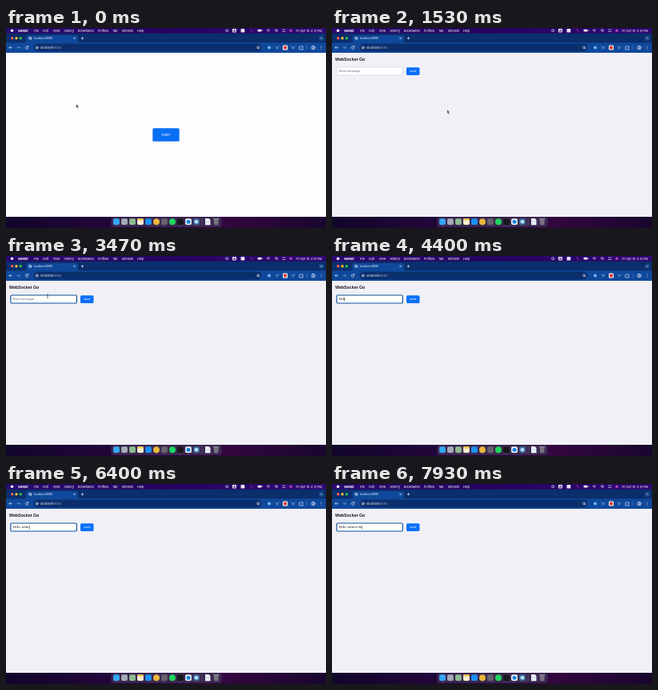
An HTML page for the animation above (8000 ms loop, 400 by 250 pixels).

```html
<!DOCTYPE html>
<html lang="en">
<head>
<meta charset="utf-8">
<title>WebSocket Go</title>
<style>
  html, body { margin: 0; width: 100%; height: 100%; overflow: hidden; background: #170536; }
  svg { display: block; width: 100vw; height: 100vh; }
  text { font-family: Inter, Roboto, sans-serif; font-size: 3.7px; fill: #fff; white-space: pre; }
  .arial { font-family: "Liberation Sans", Arial, sans-serif; }
  .bold { font-weight: 700; }
  .line { fill: none; stroke: #e4ecfa; stroke-width: .65; stroke-linecap: round; stroke-linejoin: round; }

  #start, #chat, #hover, #pointer, #arrow, #hand, #beam, #focus {
    animation: 8s infinite step-end;
  }
  #start { animation-name: start; }
  #chat { animation-name: chat; }
  #hover { animation-name: hover; }
  #focus { animation-name: focus; }
  #pointer { animation-name: move; animation-timing-function: ease-in-out; }
  #arrow { animation-name: arrow; }
  #hand { animation-name: hover; }
  #beam { animation-name: beam; }

  @keyframes start { 0% { opacity: 1 } 13.5%, 100% { opacity: 0 } }
  @keyframes chat { 0% { opacity: 0 } 13.5%, 100% { opacity: 1 } }
  @keyframes hover { 0% { opacity: 0 } 6.8% { opacity: 1 } 13.5%, 100% { opacity: 0 } }
  @keyframes focus { 0% { opacity: 0 } 27%, 100% { opacity: 1 } }
  @keyframes arrow { 0% { opacity: 1 } 6.8% { opacity: 0 } 13.5% { opacity: 1 } 23%, 100% { opacity: 0 } }
  @keyframes beam { 0% { opacity: 0 } 23% { opacity: 1 } 46.25%, 100% { opacity: 0 } }
  @keyframes move {
    0%, 1.5% { transform: translate(87.7px, 95.2px) }
    7.6%, 15% { transform: translate(194.5px, 131px) }
    25%, 100% { transform: translate(52px, 50px) }
  }
</style>
</head>
<body>
<svg viewBox="0 0 400 250" preserveAspectRatio="none">
  <defs>
    <linearGradient id="menuFill">
      <stop offset="0" stop-color="#2a0871"/><stop offset=".5" stop-color="#25045f"/><stop offset="1" stop-color="#300775"/>
    </linearGradient>
    <linearGradient id="deskFill">
      <stop offset="0" stop-color="#12062b"/><stop offset=".3" stop-color="#210639"/>
      <stop offset=".7" stop-color="#32073f"/><stop offset="1" stop-color="#19062d"/>
    </linearGradient>
  </defs>

  <!-- Menu bar -->
  <rect width="400" height="7.5" fill="url(#menuFill)"/>
  <circle cx="7.5" cy="3.2" r="1.7" fill="#fff"/>
  <g id="menu"></g>
  <g id="status">
    <circle cx="276" cy="3.2" r="1.5" class="line" stroke-width="1"/>
    <rect x="283" y="1" width="4.8" height="4.6" rx=".8" fill="#fff"/>
    <path d="M284.2 4.8l1.2-3 1.2 3m-2-1h1.6" class="line" style="stroke:#25045f"/>
    <rect x="293.5" y="1" width="4.8" height="4.6" rx=".8" fill="#e9e3f6"/>
    <path d="M305.8 1.6l2.4 3.2" class="line" style="stroke:#d64a82"/>
    <rect x="314.5" y="1.8" width="5" height="2.8" rx=".8" fill="#eee"/>
    <path d="M320.2 2.8v.8M326 2.4q1.8-1.4 3.6 0M326.8 3.5q1-.8 2 0M327.8 4.6v.1" class="line"/>
    <circle cx="337.6" cy="2.8" r="1.3" class="line"/>
    <path d="M338.7 3.9l1.1 1.1M345.5 2h3.6M345.5 4.4h3.6" class="line"/>
    <circle cx="356" cy="3.2" r="1.8" fill="#b04ca8"/>
  </g>
  <text x="362.5" y="4.7">Fri Apr 18  4:12 PM</text>

  <!-- Tab strip -->
  <rect y="6.7" width="400" height="12" fill="#0b2e6c"/>
  <circle cx="7.7" cy="12.8" r="1.7" fill="#ff5f57"/>
  <circle cx="13" cy="12.8" r="1.7" fill="#febc2e"/>
  <circle cx="18.3" cy="12.8" r="1.7" fill="#28c840"/>
  <path d="M24 18.7q1.5 0 1.5-1.5V11q0-2 2-2H88q2 0 2 2v6.2q0 1.5 1.5 1.5z" fill="#10499b"/>
  <circle cx="30.2" cy="12.8" r="1.6" class="line"/>
  <path d="M28.8 12.3l2 .8.6 1" class="line"/>
  <text x="34.8" y="14" style="font-size:3.3px">localhost:8080</text>
  <path d="M84.7 11.9l1.8 1.8m0-1.8l-1.8 1.8M94 12.8h3m-1.5-1.5v3" class="line"/>
  <rect x="391" y="9.8" width="6" height="6" rx="1.5" fill="#174889"/>
  <path d="M393 12.3l1.1 1.1 1.1-1.1" class="line"/>

  <!-- Toolbar -->
  <rect y="18.2" width="400" height="12.8" fill="#10499b"/>
  <path d="M7.4 24.5H4m1.4-1.5L4 24.5 5.4 26" class="line"/>
  <path d="M14 24.5h3.4M16 23l1.4 1.5L16 26" class="line" style="stroke:#7fa1d2"/>
  <path d="M27.6 23.6a1.8 1.8 0 1 0 .2 1.5M27.8 22.4v1.4h-1.4" class="line"/>
  <rect x="34.5" y="19.8" width="285" height="9.4" rx="4.7" fill="#0b2e6c"/>
  <circle cx="38.7" cy="24.5" r="1.6" class="line"/>
  <path d="M38.7 24.3v1" class="line"/>
  <text x="43.2" y="25.8">localhost<tspan fill="#9cafd0">:8080</tspan></text>
  <circle cx="315" cy="24.3" r="1.4" class="line"/>
  <path d="M316 25.3l.8.8" class="line"/>
  <circle cx="329" cy="24.5" r="2" fill="#6db7f5"/>
  <path d="M337.3 23l1.7 3 1.7-3M357.3 23l1.7 3 1.7-3" class="line" style="stroke:#b5c5de"/>
  <rect x="346" y="21.5" width="6" height="6" rx="1.2" fill="#f4f4f4"/>
  <rect x="347" y="22.5" width="4" height="4" rx="1" fill="#d93c3c"/>
  <path d="M367.2 23.2h1.3q.8-1.8 1.6 0h1.1v1.2q-1.5.4 0 1.2v1.3h-4z" class="line"/>
  <path d="M376.2 22.2v4.6" class="line" style="stroke:#5284c7"/>
  <circle cx="384" cy="24.5" r="2.3" class="line"/>
  <circle cx="384" cy="23.9" r=".8" fill="#e4ecfa"/>
  <path d="M382.7 26q1.3-1.2 2.6 0M394 22.8v.1M394 24.5v.1M394 26.2v.1" class="line"/>

  <!-- First page -->
  <g id="start">
    <rect y="31" width="400" height="205" fill="#fdfdfe"/>
    <rect x="183.3" y="125.2" width="33.4" height="16.6" rx="1.6" fill="#0a6ff5"/>
    <text x="200" y="134.8" text-anchor="middle" class="arial">START</text>
    <g id="hover" fill="none" stroke="#173a70" stroke-width=".6">
      <rect x="183.3" y="125.2" width="33.4" height="16.6" rx="1.6"/>
      <path d="M187 126.2q6.5-5.6 13 0" stroke="#333"/>
    </g>
  </g>

  <!-- Second page -->
  <g id="chat">
    <rect y="31" width="400" height="205" fill="#f0f0f6"/>
    <text x="4" y="41" class="arial bold" style="font-size:5.3px;fill:#16161c">WebSocket Go</text>
    <rect x="5.8" y="49" width="82.6" height="10" rx="1.4" fill="#fff" stroke="#c7c9d0" stroke-width=".5"/>
    <rect id="focus" x="5.8" y="49" width="82.6" height="10" rx="1.4" fill="none" stroke="#1c5aa6" stroke-width="1.2"/>
    <text id="message" x="8.7" y="55.3" class="arial" style="font-size:3.9px"></text>
    <rect id="caret" y="52" width=".5" height="4.2" fill="#111"/>
    <rect x="93" y="49.2" width="16.5" height="9.9" rx="1.6" fill="#0a70fb"/>
    <text x="101.2" y="55.3" text-anchor="middle" class="arial">send</text>
  </g>

  <!-- Dock -->
  <rect y="236" width="400" height="14" fill="url(#deskFill)"/>
  <rect x="131.5" y="236.3" width="138" height="12.4" rx="3" fill="#3b2850"/>
  <g id="dock"></g>
  <path d="M245.2 238v8.5" class="line" style="stroke:#77658a;stroke-width:.4"/>
  <path d="M249 238h4.5l2 2v6.2H249z" fill="#eef3f7"/>
  <path d="M250.2 241.5h4M250.2 243.3h4" class="line" style="stroke:#a9b9c5;stroke-width:.4"/>
  <path d="M259.4 238.3h6.6l-.8 8h-5z" fill="#77717f"/>
  <path d="M259.4 238.5h6.6" class="line" style="stroke:#aaa4b2"/>

  <!-- Mouse pointer -->
  <g id="pointer">
    <path id="arrow" d="M0 0v4.5l1-.9.8 1.7.8-.4-.8-1.6h1.4z" fill="#111" stroke="#fff" stroke-width=".35"/>
    <path id="hand" d="M-.4 0q.7-.6 1 .2v1.5l2 .6q.6.3.3 1.5l-.6 1.4h-2.5L-1.7 3.2q.1-.9 1.3-.1z" fill="#fff" stroke="#333" stroke-width=".35"/>
    <path id="beam" d="M-.8-2.2q.8 0 .8.6q0-.6.8-.6M0-1.6v3.4M-.8 2.4q.8 0 .8-.6q0 .6.8.6" fill="none" stroke="#222" stroke-width=".55"/>
  </g>
</svg>
<script>
  const byId = id => document.getElementById(id);

  const addShape = (parent, tag, attrs, label = "") => {
    const node = document.createElementNS("http://www.w3.org/2000/svg", tag);
    for (const [key, value] of Object.entries(attrs)) node.setAttribute(key, value);
    node.textContent = label;
    byId(parent).append(node);
  };

  const menuItems = {
    Walnut: 15, File: 34.8, Edit: 46.3, View: 58.8, History: 72.5,
    Bookmarks: 90, Profiles: 115, Tab: 133.2, Window: 144.8, Help: 164
  };
  Object.entries(menuItems).forEach(([label, x], i) =>
    addShape("menu", "text", { x, y: 4.7, class: i ? "" : "bold" }, label));

  const dockColors = ["#33a8f3", "#a5abb5", "#8dbb91", "#f5efd2", "#1b91f5", "#e9b83b",
    "#66636b", "#1ed760", "#17191d", "#f1f6fc", "#376b9f"];
  dockColors.forEach((fill, i) => {
    const cx = 138 + i * 10;
    if (i === 5 || i === 7) addShape("dock", "circle", { cx, cy: 242.2, r: 4, fill });
    else addShape("dock", "rect", { x: cx - 3.9, y: 238.3, width: 7.8, height: 7.8, rx: 1.8, fill });
  });
  addShape("dock", "circle", { cx: 228, cy: 242.2, r: 2.5, fill: "#1683d8" });
  addShape("dock", "circle", { cx: 238, cy: 242.2, r: 2.4, fill: "#b8dcf1" });
  addShape("dock", "rect", { x: 164.1, y: 238.3, width: 7.8, height: 2.2, rx: 1, fill: "#f3c84c" });
  for (const cx of [138, 188, 198, 218, 228, 238])
    addShape("dock", "circle", { cx, cy: 247.8, r: .4, fill: "#c9bed3" });

  // Each burst has a start, an interval and keys; "<" is backspace.
  const bursts = [
    [3700, 190, "Hello, ha"], [5520, 120, "<<"],
    [5780, 140, "what "], [6560, 260, "is lin"]
  ];

  const typedAt = time => {
    let typed = "";
    for (const [start, interval, keys] of bursts)
      [...keys].forEach((key, i) => {
        if (time >= start + i * interval) typed = key === "<" ? typed.slice(0, -1) : typed + key;
      });
    return typed;
  };

  const message = byId("message"), caret = byId("caret");
  let origin, shown;

  function render(now) {
    origin ??= now;
    const typed = typedAt((now - origin) % 8000);
    if (typed !== shown) {
      shown = typed;
      message.textContent = typed || "Enter message";
      message.style.fill = typed ? "#16161c" : "#62646b";
      caret.style.opacity = typed ? 1 : 0;
      caret.setAttribute("x", 8.8 + message.getComputedTextLength());
    }
    requestAnimationFrame(render);
  }
  requestAnimationFrame(render);
</script>
</body>
</html>
```
